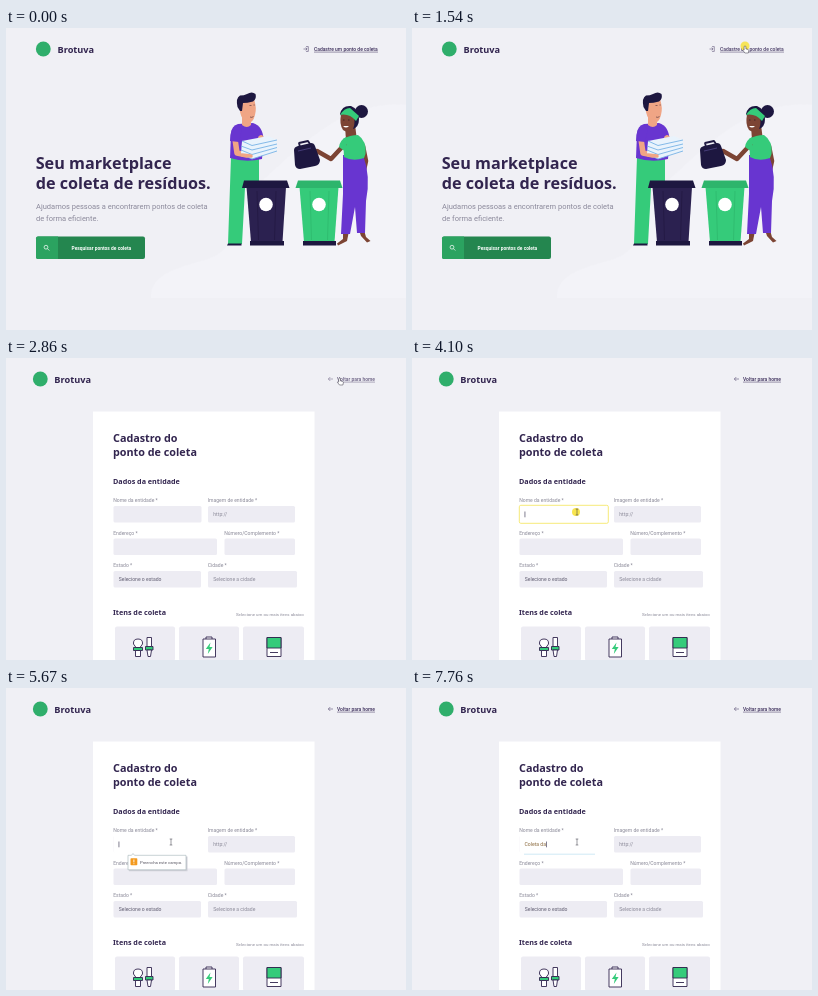
Recreate the animation shown at these times as an HTML page. Size 400 by 302 pixels, loop 8 s.

```html
<!DOCTYPE html>
<html lang="pt-BR">
<head>
<meta charset="utf-8">
<title>Pontos de coleta</title>
<style>
html, body { margin: 0; width: 100%; height: 100%; overflow: hidden; background: #f0f0f5; }
svg { display: block; width: 100%; height: 100%; }
text { font-family: Roboto, sans-serif; font-size: 5.05px; fill: #8a8998; }
.head { font-family: "Noto Sans", sans-serif; font-weight: 700; fill: #32254f; }
.brand { font-size: 9.2px; font-weight: 600; }
.hero { font-size: 16.2px; }
.lead { font-size: 7.51px; fill: #8b899b; }
.link text { font-size: 4.95px; font-weight: 500; fill: #3a2c59; }
.link path { fill: none; stroke: #3a2c59; stroke-width: .5; }
.title { font-size: 10.8px; }
.legend { font-size: 7.2px; }
.field { fill: #edecf3; }
.icon { stroke: #32254f; stroke-width: .9; stroke-linejoin: round; fill: #fff; }
.skin { fill: #f0a585; }
.dark { fill: #1d1740; }
.green { fill: #35cb7a; }
.purple { fill: #6835d0; }
.brown { fill: #7c4434; }
.limb { fill: none; stroke-linecap: round; stroke-linejoin: round; }
</style>
</head>
<body>
<svg viewBox="0 0 400 302" preserveAspectRatio="none">
<rect width="400" height="302" fill="#f0f0f5"/>

<g id="home">
  <path fill="#f3f3f8" d="M145 270C144 246 171 240 202 231C238 219 226 178 258 151C293 120 337 71 400 77V270Z"/>
  <circle cx="37.3" cy="21" r="7.4" fill="#2fae6b"/>
  <text class="head brand" x="51.5" y="24.6">Brotuva</text>
  <g class="link" id="signup">
    <path d="M297.5 21H301M299.7 19.6L301.1 21L299.7 22.4M300 18.6H302.3V23.4H300"/>
    <text x="308" y="22.8">Cadastre um ponto de coleta</text>
    <path d="M308 24.1H372"/>
  </g>
  <rect id="focus" x="295.5" y="16.5" width="78.5" height="9.5" fill="none" stroke="#8f8da0" stroke-width=".6" stroke-dasharray="1 1"/>

  <text class="head hero" x="29.7" y="140.5">Seu marketplace</text>
  <text class="head hero" x="29.7" y="160.6">de coleta de resíduos.</text>
  <text class="lead" x="30" y="181">Ajudamos pessoas a encontrarem pontos de coleta</text>
  <text class="lead" x="30" y="192.6">de forma eficiente.</text>

  <rect x="30" y="208.5" width="109" height="22.5" rx="2" fill="#24864f"/>
  <path d="M32 208.5H52V231H32Q30 231 30 229V210.500Q30 208.500 32 208.500Z" fill="#2ba360"/>
  <g fill="none" stroke="#fff" stroke-width=".7"><circle cx="40" cy="219.200" r="1.900"/><path d="M41.400 220.600L43.300 222.500"/></g>
  <text x="65.500" y="221.500" style="font-size:4.9px;font-weight:700;fill:#fff">Pesquisar pontos de coleta</text>

  <!-- man -->
  <path class="green" d="M225 129H253V160H239L236 216H222Z"/>
  <path class="dark" d="M222 215.500H235.500V217.500H221Z"/>
  <path class="purple" d="M232 96Q226 98 225 105L224 130Q240 135 256 131L257.500 112Q257 98 247 95Z"/>
  <path class="skin" d="M236 88H245V97Q241 101 236 97Z"/>
  <path class="skin" d="M234 74L248 71Q251 80 249 87Q247 95 242 95Q236 93 234 84Z"/>
  <path class="dark" d="M231.500 79Q229.500 70 234 67.500Q238 67.500 241 66Q246 63 249.500 66Q251 71 247 73.500Q241 75 237 75L236 83H234Z"/>
  <path d="M243.500 77.500h2M247.500 77h1.300M244 89Q246 90 247.500 88.500" fill="none" stroke="#4a2c36" stroke-width=".6"/>
  <path class="limb" d="M229 111L231 125L241 127M255 110L258 114" stroke="#f0a585" stroke-width="5.500"/>
  <path class="purple" d="M231 97Q224 99 224 113L233 114L236 101Z"/>
  <path d="M236 113L262 108L271 112V123L246 131L235 126Z" fill="#e9f3fc"/>
  <path d="M236 113L246 117.500L271 112M235 118L246 122L271 116M235 122L246 126.500L271 119.500M235 126L246 131L271 123" fill="none" stroke="#78b3e6" stroke-width=".9"/>
  <path class="limb" d="M236 127L245 128" stroke="#f0a585" stroke-width="3.500"/>

  <!-- woman -->
  <path class="brown" d="M337 203L343 203L341 213L332 217.500L331 215.500L337 211ZM353 202H358L360 209L364.500 213L361 214.500L355 208Z"/>
  <path class="limb" d="M357 118L360 133L356 151" stroke="#7c4434" stroke-width="4.500"/>
  <path class="purple" d="M337 127H357Q365 148 360 173L359 205H351L349 179L344 206H335L337 166Z"/>
  <path class="brown" d="M339 98L349 97L351 112H340Z"/>
  <path class="green" d="M337 111Q344 107 352 107Q361 113 359.500 126L358 130Q347 134 338 129Z"/>
  <path class="dark" d="M334 86Q336 77 345 78Q353 81 353 91Q353 99 347 101L339 95Z"/>
  <circle class="dark" cx="355.500" cy="83.500" r="6.500"/>
  <path class="brown" d="M335 87Q341 82 347 87Q350 94 347 101Q342 106 337 102Q333 96 335 87Z"/>
  <path class="green" d="M334 87Q338 80 344 80L353 88L350 93Q343 85 334 87Z"/>
  <path d="M337 98Q340 101 343 98Z" fill="#fff"/>
  <path d="M337 92h1.500M342 92h1.500" stroke="#2a1620" stroke-width=".7"/>
  <path class="limb" d="M338 117L325 131L311 123" stroke="#7c4434" stroke-width="4.500"/>
  <path class="green" d="M340 109Q334 112 333 119L340 124Z"/>
  <path class="dark" d="M288 122Q288 119 292 118L305 115Q308 115 309 118L314 132Q314 137 309 138L294 141Q290 141 289 137Z"/>
  <path class="limb" d="M294 119L293 115L302 113L304 116" stroke="#1d1740" stroke-width="1.800"/>
  <path d="M292 123L305 120" stroke="#514788" stroke-width=".8"/>

  <!-- bins -->
  <path fill="#2b2150" d="M240.500 159H280L276.500 214H245Z"/>
  <path class="dark" d="M238 152.500H281L283.500 160H236ZM244 213H278V217.500H244Z"/>
  <path class="green" d="M293.500 159H332.500L328.500 214H298Z"/>
  <path fill="#2db56c" d="M292 152.500H334L336.500 160H289.500Z"/>
  <path class="dark" d="M297 213H330V217.500H297Z"/>
  <path d="M251 163L252.500 212M270 163L268.500 212" stroke="#241a45" stroke-width="1"/>
  <path d="M304 163L305.500 212M323 163L321.500 212" stroke="#2fbd70" stroke-width="1"/>
  <circle cx="260" cy="176.500" r="6.800" fill="#fff"/>
  <circle cx="313" cy="176.500" r="6.800" fill="#fff"/>
</g>

<g id="form">
  <circle cx="34.300" cy="21" r="7.400" fill="#2fae6b"/>
  <text class="head brand" x="48.300" y="24.600">Brotuva</text>
  <g class="link" id="back">
    <path d="M327 21H322.300M324.300 19L322.300 21L324.300 23"/>
    <text x="331" y="22.800">Voltar para home</text>
    <path d="M331 24.100H369"/>
  </g>
  <rect x="87" y="53.500" width="221.500" height="249" fill="#fff"/>
  <text class="head title" x="107" y="84">Cadastro do</text>
  <text class="head title" x="107" y="97.500">ponto de coleta</text>
  <text class="head legend" x="107" y="126.300">Dados da entidade</text>
  <g id="fields"></g>
  <rect id="active" x="107.500" y="147.500" width="88.500" height="17.500" rx="1.500" fill="#fff"/>
  <rect id="ring" x="107.300" y="147.300" width="89" height="18" rx="1.500" fill="none" stroke="#f5e86a" stroke-width=".9"/>
  <path id="edge" d="M112 166.200H183" stroke="#c3e4f3" stroke-width=".8"/>
  <text id="typed" x="112.500" y="158.300" style="font-size:5.1px;fill:#8a693c;white-space:pre"></text>
  <rect id="caret" y="153.500" width=".7" height="5.800" fill="#4b4660"/>

  <text class="head legend" x="107" y="256.500">Itens de coleta</text>
  <text x="230" y="258" style="font-size:4.4px">Selecione um ou mais itens abaixo</text>
  <g class="field"><rect x="109" y="268.500" width="60" height="34" rx="2"/><rect x="173" y="268.500" width="60" height="34" rx="2"/><rect x="237" y="268.500" width="61" height="34" rx="2"/></g>
  <g class="icon">
    <path d="M127.500 286Q127 281 132 281Q137 281 136.500 286L134 289.500H130Z"/>
    <path class="green" d="M127.500 289.500H136.500V292.500H127.500ZM139.500 288.500H147V292H139.500Z"/>
    <path d="M129.500 292.500H134.500V298.500H129.500ZM141 279.500H145.500V288.500H141ZM141 292H145.500L144.500 298.500H142Z"/>
    <path d="M200 281V279H206V281M197 281H209.500V299H197Z"/>
    <path class="green" stroke="none" d="M204.500 284.500L199.800 291H202.800L201.800 296L206.600 289H203.500Z"/>
    <path d="M261 279.500H275V298.500H261Z"/>
    <path class="green" d="M261 279.500H275V290H261Z"/>
    <path d="M264 294.500H272"/>
  </g>

  <g id="tip">
    <path d="M123 168.500H181.500V183.200H123Z" fill="#cfcfd8"/>
    <path d="M122 167.300H125.500L127 165.500L128.500 167.300H180V181.800H122Z" fill="#fff" stroke="#a3b4b8" stroke-width=".6"/>
    <rect x="124.500" y="170.300" width="6.800" height="7" rx=".8" fill="#f39a1f"/>
    <path d="M127.900 171.500V174.400M127.900 175.300V176.200" stroke="#fff" stroke-width=".9"/>
    <text x="134" y="176" style="font-size:4.25px;fill:#55535f">Preencha este campo.</text>
  </g>
</g>

<circle id="disc" r="4.500" fill="#f7e23c"/>
<g id="pointer" stroke="#33303f" stroke-width=".5" fill="#fff">
  <path id="arrow" d="M0 0v6.600l1.600-1.400 1 2.300 1-.4-1-2.200h2.100z"/>
  <path id="hand" d="M0 0q.9 0 .9 .9v2l2.200.6q.8.300.7 1.200l-.5 2.300h-3.400l-2-2.600q.3-.9 1.200-.3V.9q0-.9 .9-.9z"/>
  <path id="beam" fill="none" d="M-1.300-3h2.600M0-3v6M-1.300 3h2.600"/>
</g>
</svg>

<script>
const LOOP = 8000, CUT = 2860, CLICK = 4100;
const el = {};
document.querySelectorAll('[id]').forEach(n => el[n.id] = n);

// x, y, width, label, value
const fields = [
  [107.5, 148, 88, 'Nome da entidade *', ''],
  [202, 148, 87, 'Imagem de entidade *', 'http://'],
  [107.5, 180.500, 103.500, 'Endereço *', ''],
  [218.500, 180.500, 70.500, 'Número/Complemento *', ''],
  [107.5, 213, 87.500, 'Estado *', 'Selecione o estado'],
  [202, 213, 89, 'Cidade *', 'Selecione a cidade']
];
el.fields.innerHTML = fields.map(([x, y, w, label, value]) =>
  `<rect class="field" x="${x}" y="${y}" width="${w}" height="16.5" rx="1.5"/>
   <text x="${x - .3}" y="${y - 3.800}">${label}</text>
   <text x="${x + 5.300}" y="${y + 10}" style="fill:${label === 'Estado *' ? '#5f5c70' : '#8a8998'}">${value}</text>`
).join('');

const phrase = 'Coleta da';
const keys = [6120, 6440, 6590, 6670, 6900, 6990, 7290, 7520, 7690];

const ramp = (t, a, b) => Math.min(1, Math.max(0, (t - a) / (b - a)));
const ease = p => p * p * (3 - 2 * p);
const mix = (a, b, p) => a + (b - a) * p;
const show = (n, on) => n.style.display = on ? '' : 'none';
const fade = (n, o) => { n.style.opacity = o; show(n, o > 0); };

function bend(a, c, b, p) {
  const q = 1 - p;
  return [0, 1].map(i => q * q * a[i] + 2 * p * q * c[i] + p * p * b[i]);
}

function pointerAt(t) {
  if (t < 1020) return bend([353, 298], [305, 150], [332, 37], ease(ramp(t, 120, 980)));
  if (t < CUT) {
    const up = ease(ramp(t, 1020, 1480)), settle = ramp(t, 2140, 2310);
    return [mix(332, 333, up) + settle * .6, mix(37, 18, up) + settle * 2];
  }
  const p = ease(ramp(t, 3200, 3800)), nudge = ramp(t, 3880, 3950);
  return [mix(333.600, 164.500, p) + nudge * .5, mix(20, 153.500, p) + nudge * .5];
}

function draw(t) {
  const onForm = t >= CUT, focused = t >= CLICK;
  show(el.home, !onForm);
  show(el.form, onForm);

  el.signup.style.opacity = 1 - .1 * ramp(t, 1400, 1600) - .2 * ramp(t, 2140, 2310);
  fade(el.focus, ramp(t, 2400, 2620));
  el.back.style.opacity = mix(.75, 1, ramp(t, 3250, 3400));

  show(el.active, focused);
  fade(el.ring, focused ? 1 - ramp(t, 4180, 4330) : 0);
  fade(el.tip, ramp(t, 5050, 5500) * (1 - ramp(t, 5900, 6120)));
  show(el.edge, t >= 6120);

  const count = keys.filter(k => t >= k).length;
  el.typed.textContent = phrase.slice(0, count);
  const width = onForm && count ? el.typed.getComputedTextLength() : 0;
  el.caret.setAttribute('x', 112.600 + width);
  show(el.caret, focused && !(t >= 4650 && t < 5110));

  const [x, y] = pointerAt(t);
  el.pointer.setAttribute('transform', `translate(${x} ${y})`);
  show(el.pointer, t >= 200);
  const hand = onForm ? t < 3300 : t >= 1400;
  const beam = t >= 3720;
  show(el.hand, hand);
  show(el.beam, beam);
  show(el.arrow, !hand && !beam);

  el.disc.setAttribute('cx', x - (onForm ? 1 : 0));
  el.disc.setAttribute('cy', y);
  el.disc.setAttribute('r', onForm ? 4 : 4.500);
  fade(el.disc, onForm
    ? (focused ? .9 * (1 - ramp(t, 4180, 4330)) : 0)
    : (t >= 1460 ? .85 * (1 - ramp(t, 1620, 1760)) : 0));
}

function tick() {
  draw(performance.now() % LOOP);
  requestAnimationFrame(tick);
}
tick();
</script>
</body>
</html>
```
